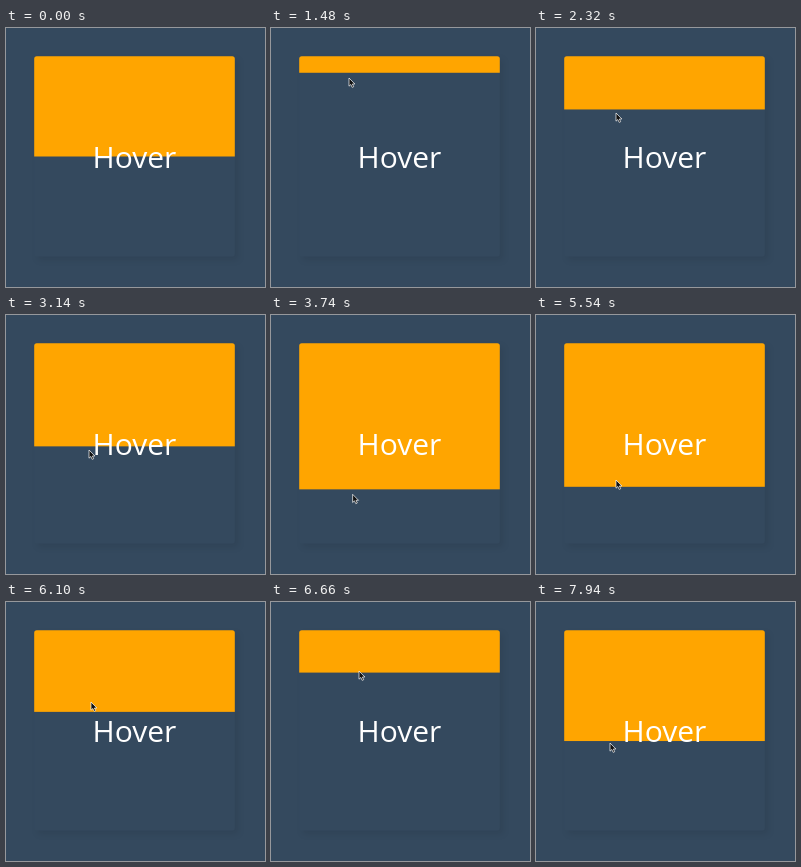
Animation, 259 px wide and 259 px high, one loop 8000 ms. Source, as an HTML page:

```html
<!DOCTYPE html>
<html lang="en">
<head>
<meta charset="utf-8">
<title>Hover fill</title>
<style>
  html, body { margin: 0; width: 100%; height: 100%; overflow: hidden; background: #34495e; }
  svg { display: block; width: 100%; height: 100%; }
  text { font: 30px "Open Sans", "Noto Sans", sans-serif; fill: #fff; text-anchor: middle; }
</style>
</head>
<body>
<svg viewBox="0 0 259 259">
  <defs>
    <clipPath id="card"><rect x="28.2" y="28.2" width="200.6" height="200.3" rx="2.5"/></clipPath>
    <filter id="shade" x="-10%" y="-10%" width="120%" height="120%" color-interpolation-filters="sRGB">
      <feDropShadow dx="3.5" dy="3.5" stdDeviation="3" flood-color="#000" flood-opacity=".08"/>
    </filter>
  </defs>
  <rect width="259" height="259" fill="#34495e"/>
  <rect x="28.2" y="28.2" width="200.6" height="200.3" rx="2.5" fill="#34495e" filter="url(#shade)"/>
  <g clip-path="url(#card)"><rect id="fill" x="28" y="28" width="201" height="100.5" fill="#ffa500"/></g>
  <text x="128.5" y="140">Hover</text>
  <path id="pointer" d="M0 0V8.2L1.8 6.5L3.2 9.4L4.7 8.7L3.4 6H5.9Z"
        fill="#111" stroke="#fff" stroke-width=".7" stroke-linejoin="round"/>
</svg>
<script>
const LOOP = 8000;
const START = 500;           // pointer comes into view
const ENTER = 900;           // pointer reaches the card
const LAG = 85;              // fill trails the pointer
const CATCH_UP = 240;        // fill leaves its resting place
const REST = 128.5;
const fill = document.getElementById('fill');
const pointer = document.getElementById('pointer');

// Pointer path: time, x, y
const path = [
  [500, 84, 0], [900, 82, 28], [1220, 80, 34], [1480, 78, 50], [2320, 80, 85],
  [3000, 83, 129], [3140, 83, 135], [3560, 82, 170], [4420, 80, 220],
  [5120, 80, 222], [5440, 80, 173], [5540, 80, 165], [6100, 85, 100],
  [6500, 87, 72], [6660, 88, 69], [6960, 87, 68], [7660, 76, 135], [7920, 74, 141]
];

function pointerAt(t) {
  const next = path.findIndex(p => p[0] >= t);
  if (next <= 0) return path[next ? path.length - 1 : 0].slice(1);
  const [t0, x0, y0] = path[next - 1];
  const [t1, x1, y1] = path[next];
  const k = (t - t0) / (t1 - t0);
  return [x0 + (x1 - x0) * k, y0 + (y1 - y0) * k];
}

function edgeAt(t) {
  const k = Math.min(1, Math.max(0, (t - ENTER) / CATCH_UP));
  const ease = k * k * (3 - 2 * k);
  const follow = Math.max(29, pointerAt(t - LAG)[1]);
  return REST + (follow - REST) * ease;
}

// The picture advances in alternating steps of 120 and 20 ms.
function stepTime(t) {
  if (t < START) return 0;
  const rest = (t - START) % 140;
  return t - rest + (rest >= 120 ? 120 : 0);
}

function draw(ms) {
  const t = stepTime(ms % LOOP);
  const [x, y] = pointerAt(t);
  fill.setAttribute('height', edgeAt(t) - 28);
  pointer.setAttribute('transform', `translate(${x} ${y})`);
  pointer.setAttribute('visibility', t < START ? 'hidden' : 'visible');
}

const begin = performance.now();
function tick() {
  draw(performance.now() - begin);
  requestAnimationFrame(tick);
}
tick();
</script>
</body>
</html>
```
